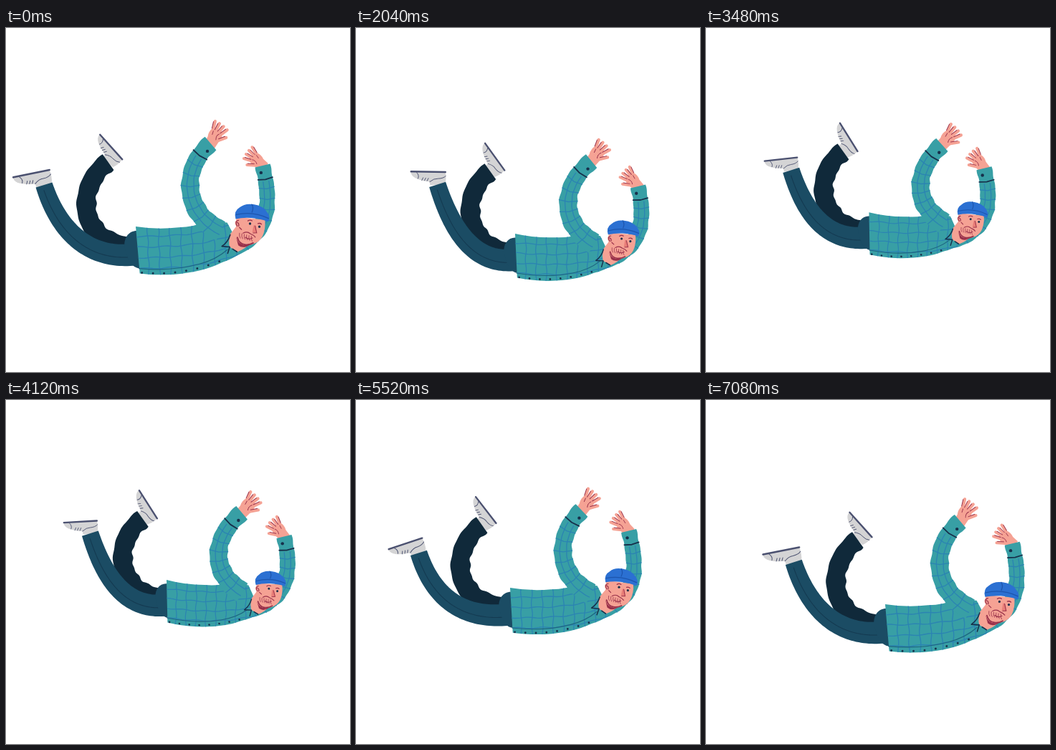
Write an HTML page with a canvas that moves like this. It is 480 by 480 pixels and loops after 7120 ms.

```html
<!DOCTYPE html>
<html lang="en">
<head>
<meta charset="utf-8">
<title>Falling man</title>
<style>
html, body { margin: 0; width: 100%; height: 100%; overflow: hidden; background: #fff; }
canvas { display: block; width: 480px; height: 480px; }
</style>
</head>
<body>
<canvas id="stage"></canvas>
<script>
const LOOP = 7120, STEP = 40;
const INK = '#17304b', NAVY = '#1b4c64', DARK = '#10293a', TEAL = '#389fa5', GRID = '#2b84b2',
      SKIN = '#f5a294', WINE = '#98304a', SHOE = '#d4d4d5', SOLE = '#4b5170';

const canvas = document.getElementById('stage');
const ctx = canvas.getContext('2d');
const dpr = window.devicePixelRatio || 1;
canvas.width = canvas.height = 480 * dpr;

// Drift of the shirt hem across the stage: time, x, y
const drift = [
  [0, 181, 277], [1000, 228, 286], [1500, 246, 281], [2040, 222, 287], [2900, 189, 280], [3800, 247, 246],
  [4120, 224, 251], [4800, 187, 256], [5520, 215, 262], [6350, 270, 276], [7080, 250, 285]
];

// Smooth curve through one column of the drift
function glide(col, t) {
  const last = drift.length - 1;
  let i = 0;
  while (i < last - 1 && t >= drift[i + 1][0]) i++;
  const slope = k => {
    const a = drift[Math.max(k - 1, 0)], b = drift[Math.min(k + 1, last)];
    return (b[col] - a[col]) / (b[0] - a[0]);
  };
  const [p, q] = [drift[i], drift[i + 1]];
  const h = q[0] - p[0], u = Math.min((t - p[0]) / h, 1), w = 1 - u;
  return p[col] * w * w * (1 + 2 * u) + q[col] * u * u * (3 - 2 * u)
    + h * u * w * (slope(i) * w - slope(i + 1) * u);
}

const add = (p, x, y) => [p[0] + x, p[1] + y];
const range = (n, f) => Array.from({ length: n }, (_, i) => f(i));

function fill(path, color) {
  ctx.fillStyle = color;
  ctx.fill(new Path2D(path));
}
function stroke(path, color, width) {
  ctx.strokeStyle = color;
  ctx.lineWidth = width;
  ctx.stroke(new Path2D(path));
}
function dot(x, y, r, color) {
  ctx.fillStyle = color;
  ctx.beginPath();
  ctx.arc(x, y, r, 0, 7);
  ctx.fill();
}
function line(points, color, width) {
  ctx.strokeStyle = color;
  ctx.lineWidth = width;
  ctx.beginPath();
  points.forEach(p => ctx.lineTo(p[0], p[1]));
  ctx.stroke();
}
function placed(p, deg, draw, sx = 1, sy = sx) {
  ctx.save();
  ctx.translate(p[0], p[1]);
  ctx.rotate(deg * Math.PI / 180);
  ctx.scale(sx, sy);
  draw();
  ctx.restore();
}

// A limb along a cubic; at(t, k) gives the point k half-widths off its middle
function limb(a, b, c, d, half) {
  const at = (t, k) => {
    const w = 1 - t;
    const pos = i => w * w * w * a[i] + 3 * w * w * t * b[i] + 3 * w * t * t * c[i] + t * t * t * d[i];
    const dir = i => w * w * (b[i] - a[i]) + 2 * w * t * (c[i] - b[i]) + t * t * (d[i] - c[i]);
    const dx = dir(0), dy = dir(1), r = k * half(t, k) / Math.hypot(dx, dy);
    return [pos(0) - dy * r, pos(1) + dx * r];
  };
  const along = (k, t0 = 0) => range(61, i => at(t0 + (1 - t0) * i / 60, k));
  const paint = color => {
    ctx.fillStyle = color;
    ctx.beginPath();
    along(1).concat(along(-1).reverse()).forEach(p => ctx.lineTo(p[0], p[1]));
    ctx.fill();
  };
  return { at, along, paint };
}

// Uneven cloth folds along an edge
const folds = u => Math.sin(u * 47) * .6 + Math.sin(u * 29 + 1) * .5;

function shoe() {
  fill('M-42-15L10-20Q13-10 11-1L-11 2L-12-3Q-24-3-33-6Q-41-9-42-15Z', SHOE);
  stroke('M-41.5-15.5L10-20', SOLE, 2.6);
  stroke('M-12-3Q-6-9 0-9Q8-10 11-14M-30-6Q-28-11-33-15', SOLE, 1);
  for (let x = -24; x < -14; x += 4) stroke(`M${x}-4l1.5-4`, SOLE, 1);
}

function hand() {
  fill('M-4-8L6-8Q13-11 20-8L22 6Q16 11 8 9L-4 8Z', SKIN);
  const finger = (x, y, deg) => placed([x, y], deg, () => {
    stroke('M0 0H12.5', SKIN, 4.2);
    stroke('M2-2.1H11.5', WINE, 1);
  });
  for (let i = 0; i < 4; i++) finger(18 - i * i * .2, i * 4 - 6, i * 13.5 - 16);
  finger(8, 7, 40);
  stroke('M8 4Q13 1 17 4M12-4L17-5', WINE, .9);
}

function sleeve(l, k) {
  l.paint(TEAL);
  for (const side of [.35, -.4]) line(l.along(side, .16), GRID, 1.3);
  for (let t = .22; t < .95; t += .11) {
    line([l.at(t, .98), l.at(t + .015, 0), l.at(t, -.98)], GRID, 1.3);
  }
  line([l.at(.13, 1), l.at(.14, 0), l.at(.13, -1)], INK, 1.8);
  dot(...l.at(.065, k), 2.2, INK);
}

const SHIRT = 'M0 0Q30 5 60 2Q82 2 98-6L128-4Q140 18 148 38Q136 47 120 52Q94 65 52 68Q25 69 5 66Z';

function shirt() {
  fill(SHIRT, TEAL);
  ctx.save();
  ctx.clip(new Path2D(SHIRT));
  for (let x = 14; x < 150; x += 15.5) {
    line(range(21, i => [x + 2 + Math.sin(i * .8 + x) * .8 + i * .1, i * 4 - 10]), GRID, 1.4);
  }
  for (let y = 14; y < 60; y += 15) {
    line(range(40, i => [i * 4, y + Math.sin(i * .7 + y) * .8 - 13 * (i / 32) ** 3]), GRID, 1.4);
  }
  ctx.restore();
  stroke('M4 59Q50 64 88 54Q112 48 128 34', '#1d6580', 1.2);
  for (let x = 8; x < 128; x += 15.5) {
    dot(x, 64.5 + 2.5 * Math.sin(x / 32) - 17 * (x / 130) ** 2.6, 1.5, INK);
  }
}

function head() {
  fill('M-20 2L-30 14Q-33 25-31 32L-20 39Q-9 35-3 28Z', SKIN);
  fill('M-22 18Q-18 33-2 29Q-12 36-19 30Z', WINE);
  stroke('M-30 15Q-33 25-42 31L-31 32M-31 32L-34 41M-21 39L-27 35', INK, 1.6);
  fill('M-21-10L19-5Q20 8 15 18Q10 27 0 29Q-13 32-19 25Q-23 10-21-10Z', SKIN);
  // Ear
  dot(-19, -1, 4, SKIN);
  stroke('M-18-5Q-24-4-20 3M-20-2Q-17-1-18 3', WINE, 1.3);
  // Beard and mouth
  stroke('M-20 19Q-18 28-10 29Q-3 30 2 27', WINE, 1.8);
  for (let i = 0; i < 6; i++) stroke(`M${i * 3.3 - 17} ${13 + i * .9}q-1 4 1 7`, WINE, .8);
  stroke('M-17 5l3 3M-12 13Q-6 10-2 14Q3 16 5 19M-9 19Q-4 23 1 20', WINE, 1.2);
  // Nose and eyes
  fill('M3 2L6 4L8 14L1 12Z', '#e87e78');
  stroke('M5 3L7 13L2 13', WINE, 1);
  dot(-2, 0, 1.7, INK);
  dot(11, 4.5, 1.7, INK);
  stroke('M-5-4Q-2-6 1-4M9 0Q12-1 14 1', WINE, 1.3);
  // Cap
  fill('M-22-7Q-25-18-16-23Q-9-29 3-27Q16-25 22-16Q28-8 23-2Q17-6 0-8Q-12-9-22-7Z', '#2b70d2');
  stroke('M-21-13Q2-18 24-7M1-16Q4-22 1-27', '#1d55ad', 1.3);
}

function draw(t) {
  const phase = 2 * Math.PI * t / LOOP;
  // Every joint swings once per loop, with a quicker sway on top
  const wave = (mid, slow, fast = 0, side = 0) =>
    mid + slow * Math.cos(phase) + fast * Math.sin(3 * phase) + side * Math.sin(phase);

  const root = [glide(1, t), glide(2, t)];
  const hx = wave(152.5, 9), hy = wave(3, -7, -3);
  const size = hx / 162;

  // The torso is skewed to follow the head and the lower hem
  const m = [size, (hy + 2) / 162, wave(-.02, .03), wave(.94, .053)];
  const body = (x, y) => add(root, m[0] * x + m[2] * y, m[1] * x + m[3] * y);
  const inBody = paint => {
    ctx.save();
    ctx.transform(...m, ...root);
    paint();
    ctx.restore();
  };

  ctx.setTransform(dpr, 0, 0, dpr, 0, 0);
  ctx.fillStyle = '#fff';
  ctx.fillRect(0, 0, 480, 480);
  ctx.lineCap = ctx.lineJoin = 'round';

  const reach = wave(-118, -10, -4.5, 4);
  const nearAnkle = add(root, reach, wave(-59, 1, 7, -4));
  const farAnkle = add(root, wave(-37, -1.5, -2.5), wave(-87.5, -2.5));

  placed(farAnkle, wave(58, -5), shoe, .9);
  limb(farAnkle, add(farAnkle, -42, 30), add(root, reach * .68, 18 * m[3]), add(root, -7, 30 * m[3]),
    (u, k) => 13 + u + folds(u) * (k < 0 ? 1.3 : .6)).paint(DARK);

  placed(nearAnkle, wave(-3.5, -3, -5, 5), shoe, size);
  const leg = limb(nearAnkle, add(nearAnkle, 18, 57), add(root, reach * .55, 49 * m[3]), add(root, 2, 39 * m[3]),
    u => 12 + 3.5 * u);
  leg.paint(NAVY);
  line(leg.along(.2, .04), '#143a51', 1.1);
  inBody(() => fill('M3 6C-10 5-17 16-16 28Q-10 58 5 59Z', NAVY));

  const rightWrist = add(root, wave(169, 8, -3, 2), wave(-73, -12, -3, 2));
  placed(rightWrist, wave(-132, -5), hand, .94, -.94);
  sleeve(limb(rightWrist, add(rightWrist, 11, 46), body(192, 12), body(133, 33),
    u => 10.5 + u + folds(u) * .6), .4);

  inBody(shirt);

  const leftWrist = add(root, wave(103.5, 1, -3, 1), wave(-105, -11, -1.5));
  placed(leftWrist, wave(-55, -6), hand);
  sleeve(limb(leftWrist, add(root, 60, leftWrist[1] - root[1] + 38), body(70, -16), body(119, 8),
    u => 11.8 + 3 * u * u + folds(u) * .7), -.4);

  placed(add(root, hx, hy), wave(-1, 0, 2), head, size);
}

const start = performance.now();
function tick() {
  const t = (performance.now() - start) % LOOP;
  draw(Math.floor(t / STEP) * STEP);
  requestAnimationFrame(tick);
}
tick();
</script>
</body>
</html>
```
